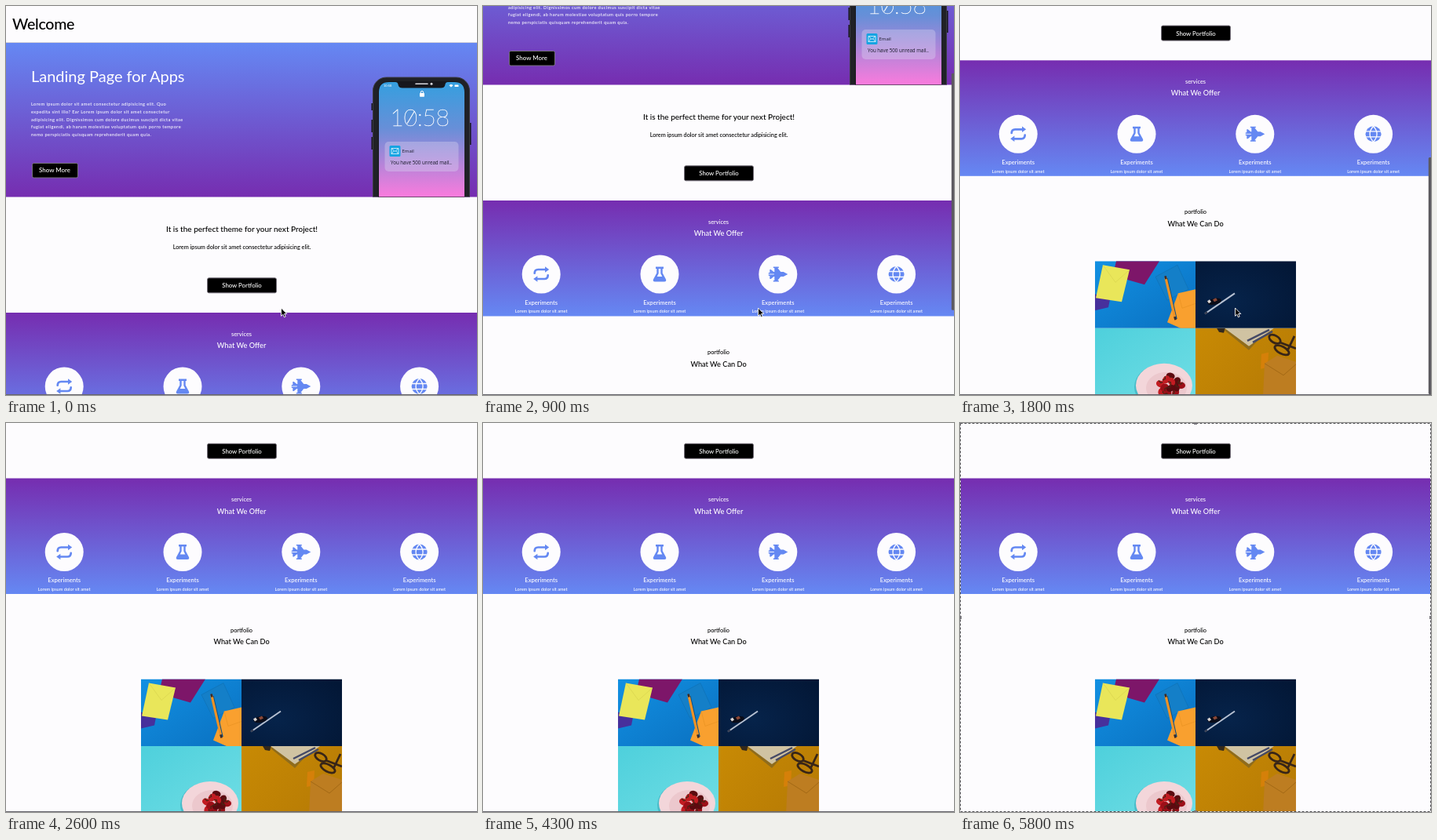
Write an HTML page that moves like this. It is 600 px wide and 496 px high and loops after 5900 ms.

```html
<!DOCTYPE html>
<html lang="en">
<head>
<meta charset="utf-8">
<title>Landing page scroll</title>
<style>
html, body { margin: 0; width: 100%; height: 100%; overflow: hidden; background: #fdfcfe; }
svg { display: block; width: 600px; height: 496px; }
text { font-family: Lato, "Open Sans", sans-serif; font-weight: 500; }
.mid { text-anchor: middle; }
.light { fill: #fff; }
.para { font-size: 5.7px; letter-spacing: .38px; fill: #fff; }
.mail { font-family: "Open Sans", sans-serif; font-weight: 400; fill: #181828; }
.btn { fill: #000; stroke: #77717c; stroke-width: 1; }
</style>
</head>
<body>
<svg viewBox="0 0 600 496" xmlns="http://www.w3.org/2000/svg">
  <defs>
    <linearGradient id="hero" x2="0" y2="1"><stop stop-color="#6588f3"/><stop offset="1" stop-color="#762db0"/></linearGradient>
    <linearGradient id="offer" x2="0" y2="1"><stop stop-color="#762db0"/><stop offset="1" stop-color="#6588f3"/></linearGradient>
    <linearGradient id="screen" x2="0" y2="1">
      <stop stop-color="#359fdf"/><stop offset=".4" stop-color="#678fd8"/>
      <stop offset=".72" stop-color="#b784d9"/><stop offset="1" stop-color="#fa7bdd"/>
    </linearGradient>
    <linearGradient id="blue" x2="1" y2="1"><stop stop-color="#1290e2"/><stop offset="1" stop-color="#0a70c0"/></linearGradient>
    <radialGradient id="navy" cx=".35" cy=".6" r=".8"><stop stop-color="#06234a"/><stop offset="1" stop-color="#031736"/></radialGradient>
    <linearGradient id="aqua" x2="1" y2="1"><stop stop-color="#4ed0dc"/><stop offset="1" stop-color="#6fdde4"/></linearGradient>
    <linearGradient id="mustard" x2="1" y2=".6"><stop stop-color="#c88a04"/><stop offset="1" stop-color="#b87c05"/></linearGradient>
    <clipPath id="heroClip"><path d="M0 47H600V243.5H0Z"/></clipPath>
    <clipPath id="tile"><path d="M0 0H128V85.5H0Z"/></clipPath>
  </defs>
  <rect width="600" height="496" fill="#fdfcfe"/>

  <g id="page">
    <text x="8" y="29.5" font-size="19.6" letter-spacing="-.3">Welcome</text>
    <path d="M0 46.5H600" stroke="#d4d2da"/>
    <rect y="47" width="600" height="196.5" fill="url(#hero)"/>
    <text class="light" x="32" y="97" font-size="20" style="font-weight:400">Landing Page for Apps</text>
    <g id="para"></g>
    <rect class="btn" x="33.5" y="200.5" width="58" height="18.5" rx="2"/>
    <text class="light mid" x="62" y="212.3" font-size="7.9">Show More</text>

    <g clip-path="url(#heroClip)">
      <path d="M467 124V133M467 145V161M467 167V183M591 149V177" stroke="#15151b" stroke-width="3"/>
      <rect x="467.5" y="91" width="123" height="200" rx="17" fill="#202126" stroke="#3c3d45"/>
      <path d="M474 260V110Q474 96 488 96H571Q584 96 584 110V260Z" fill="#17171d"/>
      <path d="M475 243.5V110Q475 97 488 97H496Q499 97 499.5 100Q500 104.5 505 104.5H554Q559 104.5 559.5 100Q560 97 563 97H571Q584 97 584 110V243.5Z" fill="url(#screen)"/>
      <path d="M522 99.3H537" stroke="#d8d8de" stroke-width="1.6" stroke-linecap="round"/>
      <circle cx="542" cy="99.3" r="1.5" fill="#d8d8de"/>
      <text class="light" x="481" y="103" font-size="4">10:58</text>
      <path d="M564.5 101.2Q567 99 569.5 101.2L567 103.5Z" fill="#fff"/>
      <rect x="571.5" y="100.5" width="5" height="2.5" rx=".6" fill="#fff"/>
      <rect x="527" y="111" width="6" height="4.8" rx=".8" fill="#fff"/>
      <path d="M528.3 111.5V110.2a1.7 1.7 0 0 1 3.4 0V111.5" fill="none" stroke="#fff"/>
      <text class="light mid" x="527" y="153" font-size="30.5" letter-spacing="-.5" style="font-weight:200" stroke="#fff" stroke-width=".35">10:58</text>
      <path d="M511 150L520.5 134" stroke="#fff" stroke-width="1.1"/>
      <rect x="482.5" y="173" width="94" height="38" rx="5" fill="#dcd8f0" fill-opacity=".36"/>
      <rect x="488.5" y="178" width="14" height="14" rx="1.5" fill="#16a4e2"/>
      <path d="M491 181.5H500V188.5H491ZL495.5 185.5L500 181.5M491 188.5L494.3 184.7M500 188.5L496.7 184.7" fill="none" stroke="#e8f6ff" stroke-width=".8"/>
      <text class="mail" x="504.5" y="187.2" font-size="6">Email</text>
      <text class="mail" x="490" y="201.8" font-size="6.2">You have 500 unread mail..</text>
    </g>

    <text class="mid" x="300.5" y="288" font-size="10">It is the perfect theme for your next Project!</text>
    <text class="mid" x="300.5" y="310.2" font-size="7.3">Lorem ipsum dolor sit amet consectetur adipisicing elit.</text>
    <rect class="btn" x="256.500" y="346.800" width="88" height="19" rx="2"/>
    <text class="light mid" x="300.500" y="359.300" font-size="7.800">Show Portfolio</text>

    <rect y="391" width="600" height="147.500" fill="url(#offer)"/>
    <text class="light mid" x="300" y="420.500" font-size="7.400">services</text>
    <text class="light mid" x="300" y="436" font-size="9.200">What We Offer</text>
    <g id="cards"></g>

    <text class="mid" x="300" y="587" font-size="7.400">portfolio</text>
    <text class="mid" x="300" y="602.500" font-size="9.200">What We Can Do</text>

    <g transform="translate(172 647)" clip-path="url(#tile)">
      <rect width="128" height="86" fill="url(#blue)"/>
      <path d="M0 42L19 49L17 59L0 63Z" fill="#47309c"/>
      <path d="M27 0H82L63 30L42 24L24 13Z" fill="#7d1669"/>
      <path d="M10 5L44 11L34 52L1 47Z" fill="#e9e65a"/>
      <path d="M10 5L26 27L44 11" fill="none" stroke="#d6d14c" stroke-width=".6"/>
      <path d="M77 20L105 5L119 36L92 50Z" fill="#147fc8" stroke="#0f6fb2" stroke-width=".6"/>
      <path d="M106 41L128 36V86H110L92 78Z" fill="#f9a02f"/>
      <path d="M106 41L111 60L128 54" fill="none" stroke="#e58f20" stroke-width=".6"/>
      <path d="M91 22L103 74" stroke="#0a4f85" stroke-width="3.500"/>
      <path d="M90 21L101.500 71" stroke="#f09225" stroke-width="3.200"/>
      <path d="M89.500 19L90.500 23M101.500 71L102.500 75" stroke="#3b2a28" stroke-width="2.600"/>
    </g>
    <g transform="translate(300 647)" clip-path="url(#tile)">
      <rect width="128" height="86" fill="url(#navy)"/>
      <path d="M12 67L50 41" stroke="#b7c1d2" stroke-width="2"/>
      <path d="M12 67L15 65" stroke="#32374a" stroke-width="2"/>
      <ellipse cx="24" cy="51.500" rx="9" ry="4" fill="#0a0c18" transform="rotate(-12 24 51)"/>
      <path d="M15 51L18 49L20 52L17 54Z" fill="#d9d4d2"/>
      <path d="M22 49L26 47L28 50L24 52Z" fill="#8a4837"/>
    </g>
    <g transform="translate(172 732.500)" clip-path="url(#tile)">
      <rect width="128" height="86" fill="url(#aqua)"/>
      <ellipse cx="86" cy="75" rx="36" ry="29" fill="#48bcc9"/>
      <ellipse cx="88" cy="73" rx="36" ry="28" fill="#f3d6da"/>
      <ellipse cx="91" cy="76" rx="26" ry="20" fill="#ecc8cd"/>
      <g id="berries"></g>
    </g>
    <g transform="translate(300 732.500)" clip-path="url(#tile)">
      <rect width="128" height="86" fill="url(#mustard)"/>
      <path d="M27 0H38L36 6L30 5Z" fill="#33291c"/>
      <path d="M36 2L94 0L68 28Z" fill="#8f6c1c"/>
      <path d="M37 0H100L68 23Z" fill="#d0c3a2"/>
      <path d="M66 16L94 2M73 18L98 4" stroke="#454a66" stroke-width="2.500"/>
      <path d="M84 33L93 31L92 50L83 52Z" fill="#d58009"/>
      <path d="M88 45L104 35L128 43V86H86Z" fill="#bd7d21"/>
      <path d="M88 45L112 60L128 46" fill="none" stroke="#9c6412" stroke-width=".8"/>
      <g fill="none" stroke="#382517" stroke-width="2.800">
        <ellipse cx="101" cy="14" rx="8" ry="4.500" transform="rotate(30 101 14)"/>
        <ellipse cx="110" cy="28" rx="10" ry="4.500" transform="rotate(28 110 28)"/>
        <path d="M107 18L128 26M117 29L126 10"/>
      </g>
    </g>
  </g>

  <rect id="thumb" x="596.800" width="4" rx="1.500" fill="#5c5a60"/>
  <path id="cursor" d="M350.500 385V395.300L352.800 393.200L354.400 396.800L356.200 396L354.600 392.500H357.800Z" fill="#000" stroke="#fff" stroke-width=".9"/>
  <path d="M0 495.500H600" stroke="#66646c"/>
  <g id="marquee">
    <rect x=".5" y=".5" width="599" height="495" fill="none" stroke="#f4f3f5"/>
    <rect x=".5" y=".5" width="599" height="495" fill="none" stroke="#4c4c50" stroke-dasharray="3 2"/>
    <path d="M298 0H302V2H298ZM298 494H302V496H298ZM0 246H2V250H0ZM598 246H600V250H598Z" fill="#77757c"/>
  </g>
</svg>
<script>
const $ = id => document.getElementById(id);
const LOOP = 5900, STEP = 100, VIEW = 496, REST = 320.5;

const lines = [
  'Lorem ipsum dolor sit amet consectetur adipisicing elit. Quo',
  'expedita sint illo? Ear Lorem ipsum dolor sit amet consectetur',
  'adipisicing elit. Dignissimos cum dolore ducimus suscipit dicta vitae',
  'fugiat eligendi, ab harum molestiae voluptatum quis porro tempore',
  'nemo perspiciatis quisquam reprehenderit quam quia.'
];
$('para').innerHTML = lines.map((s, i) =>
  `<text class="para" x="32" y="${126.8 + i * 9.85}">${s}</text>`).join('');

const arrow = '<path d="M-8.500 -1.300Q-8.500 -6 -4 -6H5" fill="none" stroke="#6488f2" stroke-width="2.700" stroke-linecap="round"/><path d="M4.800 -9.800L10 -6L4.800 -2.200Z"/>';
const icons = [
  arrow + `<g transform="rotate(180)">${arrow}</g>`,
  '<path d="M-5 -9.500H5V-7H3.700V-1.500L8 6.500Q9 9.500 6 9.500H-6Q-9 9.500 -8 6.500L-3.700 -1.500V-7H-5Z"/><path d="M-1.300 -7H1.300V-1L3.300 3H-3.300L-1.300 -1Z" fill="#fdfcfe"/>',
  '<path d="M-6 -9.500H1V-8H-.5L3.500 -3H7L12.500 0L7 3H3.500L-.5 8H1V9.500H-6V8H-4.500V3H-5.500L-9 6H-10.500V2H-12V-2H-10.500V-6H-9L-5.500 -3H-4.500V-8H-6Z"/><path d="M-12 0H-5" stroke="#fdfcfe" stroke-width=".9"/>',
  '<circle r="10"/><path d="M-10 -3.500H10M-10 3.500H10M0 -10Q-9 0 0 10Q9 0 0 -10" fill="none" stroke="#fdfcfe" stroke-width="1.300"/>'
];
$('cards').innerHTML = icons.map((icon, i) => `<g transform="translate(${74.2 + i * 150.8} 485)">
  <circle r="24.500" fill="#fdfcfe"/><g fill="#6488f2">${icon}</g>
  <text class="light mid" y="38.500" font-size="7.600">Experiments</text>
  <text class="light mid" y="49.300" font-size="5.600">Lorem ipsum dolor sit amet</text></g>`).join('');

// A loose heap of berries on a golden-angle spiral
$('berries').innerHTML = Array.from({ length: 12 }, (_, i) => {
  const a = i * 2.4, r = 4.2 * Math.sqrt(12 - i);
  const x = 95 + r * Math.cos(a), y = 73 + r * .9 * Math.sin(a);
  return `<g transform="translate(${x} ${y}) rotate(${a * 40})">
    <ellipse rx="5.500" ry="4.300" fill="${['#9c0f18', '#c21c22', '#5c0a10'][i % 3]}"/>
    <path d="M-4 -3L0 -1.500L2 -4" fill="none" stroke="#4a2414" stroke-width="1.300"/></g>`;
}).join('');

// Scroll offset every 100 ms from 200 ms: two flicks, then a rubber-band settle
const track = [0, 10, 43, 78, 103.5, 121, 134, 143, 150, 156, 164, 183, 316, 326, 325, 323.5, 321.7, 321.2, 320.8, REST];
const scrollAt = t => t < 200 ? 0 : track[Math.min(Math.floor((t - 200) / STEP), track.length - 1)];
const show = (id, on) => $(id).setAttribute('visibility', on ? 'visible' : 'hidden');

function draw(t) {
  const y = scrollAt(t), top = y * .6;
  $('page').setAttribute('transform', `translate(0 ${-y})`);
  $('thumb').setAttribute('y', top);
  $('thumb').setAttribute('height', Math.min(302, VIEW - 1 - top));
  show('thumb', t >= 300 && t < 2500);
  show('cursor', t < 2600);
  show('marquee', t >= 4800);
}

const start = performance.now();
function tick(now) {
  const t = Math.max(0, now - start) % LOOP;
  draw(Math.floor(t / STEP) * STEP);
  requestAnimationFrame(tick);
}
draw(0);
requestAnimationFrame(tick);
</script>
</body>
</html>
```
